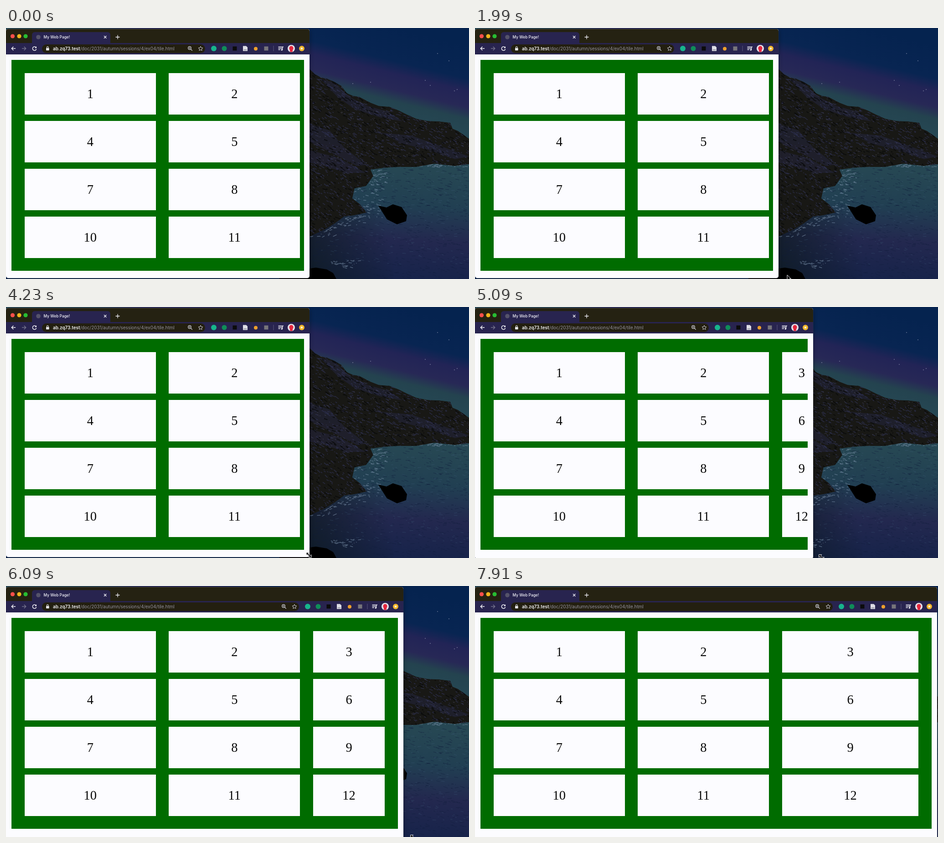
An HTML page that plays this animation: 1016 by 551 pixels, repeating every 8 s.

```html
<!DOCTYPE html>
<html lang="en">
<head>
<meta charset="utf-8">
<title>Resizing a grid page</title>
<style>
html, body { margin: 0; width: 100%; height: 100%; overflow: hidden; background: #06244f; }
.stage { position: relative; width: 1016px; height: 551px; overflow: hidden; }
.stage svg { position: absolute; display: block; }
.wall { left: 0; top: 0; }
.wall path { fill: none; }
.wall .solid path { fill: inherit; }

.window {
  position: absolute; left: 0; top: 2px; width: 666px; height: 547px;
  overflow: hidden; border-radius: 5px; background: #fcfcff;
  box-shadow: 0 0 1px #8583b0, 0 3px 10px rgba(0, 0, 0, .4);
  font-family: Inter, Roboto, sans-serif;
  animation: grow 8s linear infinite;
}
.strip { position: absolute; inset: 0 0 auto; height: 31px; background: #252212; border-top: 1px solid #3c3930; box-sizing: border-box; }
.tab { position: absolute; left: 57px; top: 7px; width: 172px; height: 24px; border-radius: 6px 6px 0 0; background: #28244f; }
.bar { position: absolute; top: 31px; left: 0; right: 0; height: 25px; background: #28244f; }
.pill { position: absolute; top: 34px; left: 79px; right: 229px; height: 19px; border-radius: 10px; background: #231f10; }
.title, .url { position: absolute; white-space: nowrap; color: #f4f4fa; }
.title { left: 82.5px; top: 12px; font-size: 8.4px; line-height: 12px; font-weight: 500; }
.url { left: 103px; top: 36px; font-size: 9.9px; line-height: 14px; color: #9694a0; }
.url b { font-weight: 600; color: #f6f6fa; }
.left { left: 0; top: 0; }
.right { right: 0; top: 0; }

.grid {
  position: absolute; left: 12.25px; right: 12.25px; top: 68px; height: 463px;
  box-sizing: border-box; padding: 29px 28.5px 28px;
  display: grid; gap: 14px 28.5px;
  grid-template-columns: 288px 288px minmax(86px, 1fr);
  grid-template-rows: repeat(4, 91px);
  background: #006c00;
  font: 28.5px "Liberation Serif", Times, serif; color: #080808;
}
.grid div { display: flex; align-items: center; justify-content: center; background: #fcfcff; }

.cursor { left: 0; top: 0; overflow: visible; animation: steer 8s linear infinite; }
.arrow { animation: pointing 8s step-end infinite; }
.resize { animation: dragging 8s step-end infinite; }

@keyframes grow {
  0%, 55.5% { width: 666px; height: 547px; }
  63.625% { width: 742px; height: 551px; }
  76.125% { width: 872px; height: 553px; }
  84.375% { width: 928px; height: 554px; }
  98.875%, 100% { width: 1014px; height: 557px; }
}
@keyframes steer {
  0%, 19% { transform: translate(698px, 565px); }
  24.875% { transform: translate(685px, 542px); }
  35%, 53.5% { transform: translate(664.5px, 544.5px); }
  63.625% { transform: translate(760px, 549px); }
  76.125% { transform: translate(893px, 552px); }
  84.375% { transform: translate(946px, 553px); }
  98.875%, 100% { transform: translate(1031px, 560px); }
}
@keyframes pointing { 0% { opacity: 1; } 34.5%, 100% { opacity: 0; } }
@keyframes dragging { 0% { opacity: 0; } 34.5%, 100% { opacity: 1; } }
</style>
</head>
<body>
<div class="stage">
  <svg class="wall" width="1016" height="551">
    <defs>
      <linearGradient id="sky" gradientUnits="userSpaceOnUse" x1="870" y1="0" x2="820" y2="206">
        <stop offset="0" stop-color="#05234f"/><stop offset=".35" stop-color="#082552"/>
        <stop offset=".48" stop-color="#222456"/><stop offset=".64" stop-color="#272856"/>
        <stop offset=".76" stop-color="#24434f"/><stop offset="1" stop-color="#264955"/>
      </linearGradient>
      <linearGradient id="sea" x1=".1" y1="0" x2="0" y2="1">
        <stop offset="0" stop-color="#264753"/><stop offset=".3" stop-color="#213f52"/>
        <stop offset=".6" stop-color="#23284f"/><stop offset="1" stop-color="#142249"/>
      </linearGradient>
      <linearGradient id="shade" gradientUnits="userSpaceOnUse" x1="670" y1="520" x2="840" y2="470">
        <stop offset="0" stop-color="#0e1a20" stop-opacity=".75"/><stop offset="1" stop-color="#0e1a20" stop-opacity="0"/>
      </linearGradient>
      <clipPath id="land" class="solid"><path id="coast" d="M600 60L666 90 678 101 690 108 704 111 722 119 736 127 748 143 762 149 775 151 800 164 818 171 842 173 862 181 880 190 900 199 925 204 950 205 975 208 980 221 992 226 1016 243V299L985 303 940 298 900 305 860 305 830 307 800 311 806 325 790 347 765 352 760 374 776 386 792 405 765 411 742 414 720 430 700 442 666 458 600 470Z"/></clipPath>
    </defs>
    <rect width="1016" height="310" fill="url(#sky)"/>
    <rect x="600" y="297" width="416" height="254" fill="url(#sea)"/>
    <rect x="600" y="400" width="250" height="151" fill="url(#shade)"/>
    <path stroke="#a9adc4" stroke-width="1.6" stroke-linecap="round"
      d="M972 72h0M947 56h0M800 119h0M920 115h0M931 126h0M984 138h0M990 135h0M761 122h0"/>
    <path id="ripplesDark" stroke="#121e3c" stroke-opacity=".55"/>
    <path id="ripplesLight" stroke="#3f5d7c" stroke-opacity=".4"/>
    <path id="foam" stroke="#7d93ac" stroke-opacity=".6" stroke-width="1.3"/>
    <g clip-path="url(#land)" class="solid">
      <use href="#coast" fill="#181815"/>
      <g fill="#2a2b4e" opacity=".4">
        <path d="M690 112L722 120 748 148 790 170 840 184 870 205 820 196 765 178 728 152Z"/>
        <path d="M666 210L710 225 742 262 790 300 770 303 730 282 666 250Z"/>
        <path d="M822 230L890 236 945 256 1016 282 985 288 925 267 870 254Z"/>
        <path d="M666 268L730 285 790 318 745 318 700 303 666 296Z"/>
      </g>
    </g>
    <g clip-path="url(#land)">
      <path id="glints" stroke="#34365e" stroke-opacity=".65" stroke-width="1.4"/>
      <path id="cracks" stroke="#090a0a" stroke-width="2" stroke-opacity=".75"/>
      <path id="sparks" stroke="#5c5d74" stroke-opacity=".6"/>
    </g>
    <g class="solid">
      <path fill="#141516" d="M817 390L835 394 849 387 868 393 880 411 878 424 858 431 836 420ZM600 537L680 526 704 530 718 538 725 551H600Z"/>
      <path fill="#2b2c42" d="M845 392L864 396 872 409 855 401Z"/>
    </g>
  </svg>

  <div class="window">
    <div class="strip"></div>
    <div class="tab"></div>
    <div class="bar"></div>
    <div class="pill"></div>
    <svg class="left" width="260" height="56" viewBox="0 2 260 56" fill="none" stroke="#f0f0f6" stroke-width="1.5">
      <g stroke="none">
        <circle cx="14.5" cy="18" r="4.6" fill="#ff4f4b"/>
        <circle cx="29" cy="18" r="4.6" fill="#efb51c"/>
        <circle cx="43" cy="18" r="4.6" fill="#27bd32"/>
        <circle cx="71" cy="20" r="4.8" fill="#55536a"/>
        <rect x="88" y="44" width="6.6" height="5.2" rx=".7" fill="#e8e8ee"/>
      </g>
      <path d="M89.5 44v-1.4a1.8 1.8 0 0 1 3.6 0V44" stroke-width="1.1"/>
      <path d="M215 17.3l5.4 5.4M220.4 17.3l-5.4 5.4M240.5 20h9M245 15.5v9" stroke-width="1.3"/>
      <path d="M21 45h-8.5M16.3 41l-4 4 4 4"/>
      <path d="M35 45h8.5M39.7 41l4 4-4 4" stroke="#72708a"/>
      <path d="M65.7 42.3A4.2 4.2 0 1 0 66.6 46.3"/>
      <path d="M67 40.3v4h-4z" fill="#f0f0f6" stroke="none"/>
    </svg>
    <div class="title">My Web Page!</div>
    <div class="url"><b>ab.zq73.test</b>/doc/2031/autumn/sessions/4/ex04/tile.html</div>
    <svg class="right" width="270" height="56" viewBox="0 2 270 56" fill="none" stroke="#d4d4de" stroke-width="1.2">
      <circle cx="7" cy="44" r="3.3"/>
      <path d="M9.5 46.5l3.3 3.3M5.4 44h3.2M7 42.4v3.2"/>
      <path d="M31 40.3l1.45 3.1 3.4.4-2.5 2.3.7 3.3-3.05-1.7-3.05 1.7.7-3.3-2.5-2.3 3.4-.4z" stroke-width="1"/>
      <g stroke="none">
        <circle cx="60" cy="45" r="6" fill="#17b58c"/>
        <circle cx="83" cy="45" r="5.5" fill="#0f8d58"/>
        <rect x="101.500" y="40.5" width="9" height="9" fill="#0b0b0b"/>
        <path d="M124 39.5h7l3 3v8h-10z" fill="#dedee6"/>
        <path d="M125.5 47h7v1.5h-7z" fill="#8a8a98"/>
        <circle cx="152" cy="45.5" r="4" fill="#eda02c"/>
        <rect x="170.5" y="40.5" width="9" height="9" fill="#77757a"/>
        <circle cx="230" cy="45" r="8" fill="#e6e2ea"/>
        <path d="M227 52v-3.5q-2-2-1.5-5 1-4 4.5-4t4.5 4q.5 3-1.5 5V52q-3 1.3-6 0z" fill="#e3273f"/>
        <circle cx="253" cy="45" r="6" fill="#f0b52c"/>
        <circle cx="253" cy="45" r="2.3" fill="#fff4d6"/>
      </g>
      <path d="M191 39v12" stroke="#5b587c" stroke-width="1"/>
      <path d="M201.5 41.5h8M201.5 44.5h8M201.5 47.5h4.5M210.5 48v-6.5h2.5" stroke="#f0f0f6" stroke-width="1.5"/>
      <circle cx="209.3" cy="48" r="1.7" fill="#f0f0f6" stroke="none"/>
    </svg>
    <div class="grid"></div>
  </div>

  <svg class="cursor" width="1" height="1" fill="#080808" stroke="#f4f4f8" stroke-width="1">
    <path class="arrow" d="M0 0v12l2.8-2.6 2 4.4 2-.9-2-4.3h3.9z"/>
    <path class="resize" d="M-5.5-5.5h6L-1.3-3.2 3.2 1.3 5.5-.5v6h-6L1.3 3.2-3.2-1.3-5.5.5z"/>
  </svg>
</div>

<script>
const grid = document.querySelector('.grid');
for (let n = 1; n <= 12; n++) {
  grid.appendChild(document.createElement('div')).textContent = n;
}

let seed = 7;
const random = () => (seed = (seed * 16807) % 2147483647) / 2147483647;
const between = (a, b) => a + (b - a) * random();

// Adds short strokes over a box to a path, each falling by about the slope.
function scatter(id, count, [x0, y0, x1, y1], length, slope) {
  const path = document.getElementById(id);
  let d = path.getAttribute('d') || '';
  for (let i = 0; i < count; i++) {
    const x = between(x0, x1), y = between(y0, y1);
    const dx = between(1, length), dy = dx * between(slope - .3, slope + .3);
    d += `M${x.toFixed(1)} ${y.toFixed(1)}l${dx.toFixed(1)} ${dy.toFixed(1)}`;
  }
  path.setAttribute('d', d);
}

scatter('ripplesDark', 700, [666, 308, 1016, 551], 10, .1);
scatter('ripplesLight', 260, [690, 315, 1016, 520], 8, .1);
scatter('foam', 45, [785, 312, 835, 346], 8, .1);
scatter('foam', 70, [760, 350, 826, 418], 7, .2);
scatter('foam', 40, [690, 410, 790, 436], 8, -.2);
scatter('foam', 25, [666, 436, 720, 460], 8, -.3);
scatter('foam', 30, [712, 510, 775, 526], 8, .1);
scatter('foam', 45, [850, 299, 1016, 305], 9, 0);
scatter('glints', 1100, [655, 90, 1016, 320], 8, .5);
scatter('glints', 260, [655, 320, 800, 455], 6, .7);
scatter('cracks', 900, [655, 90, 1016, 455], 9, .6);
scatter('sparks', 260, [655, 100, 1016, 310], 4, .4);
</script>
</body>
</html>
```
